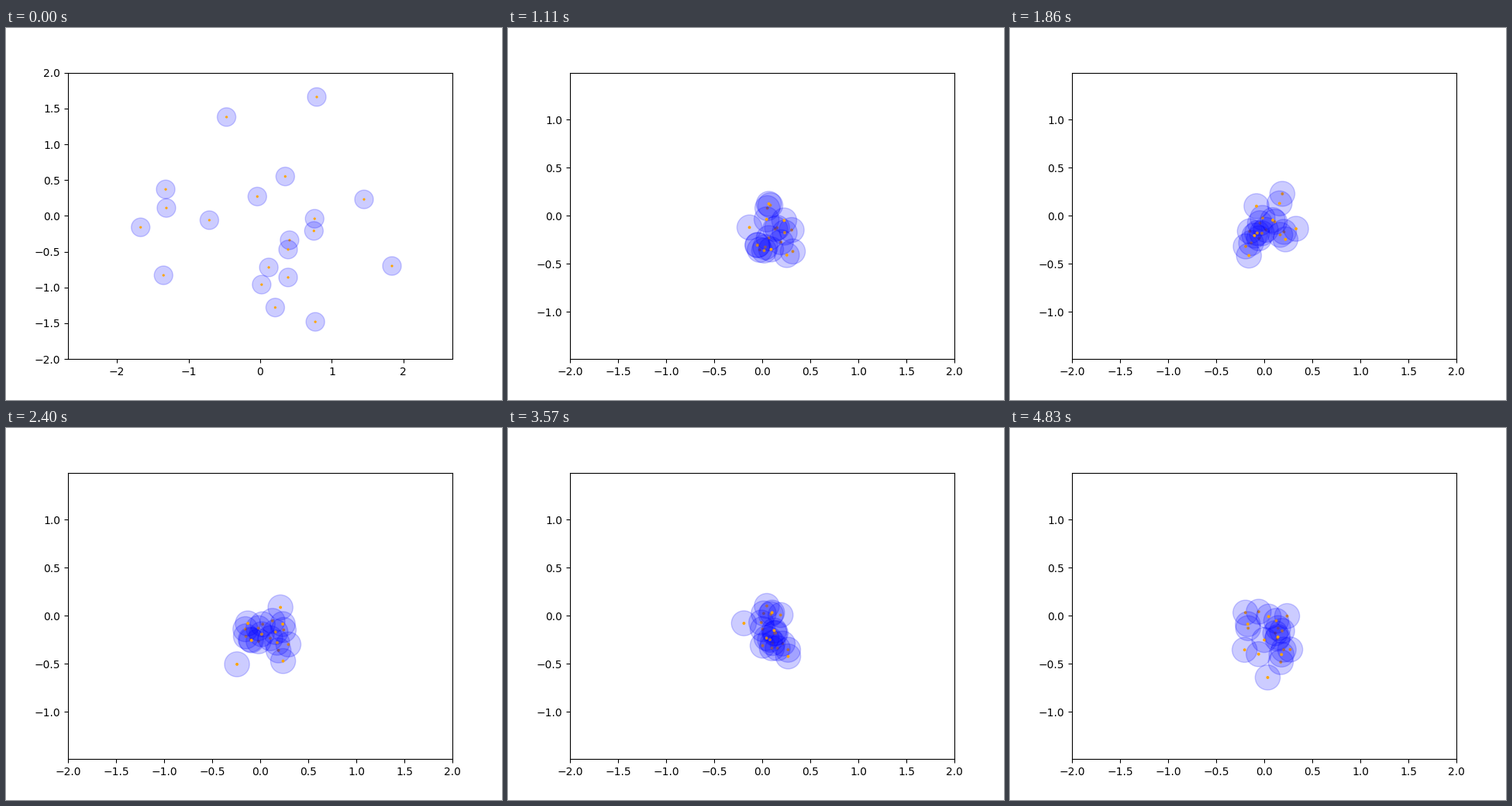
These frames come from a looping animation (640 by 480 pixels, 4.86 s). A matplotlib script:

```python
import numpy as np
import matplotlib.pyplot as plt
from matplotlib.animation import FuncAnimation
from matplotlib.patches import Circle

FRAMES, INTERVAL = 162, 30
KEEP = 0.75      # share of the distance to the centre kept per step
SPREAD = 0.155   # standard deviation of the settled swarm

START = np.array([
    (0.79, 1.66), (-0.47, 1.38), (0.35, 0.55), (-1.32, 0.37),
    (-1.31, 0.11), (-1.67, -0.16), (-0.71, -0.06), (-0.04, 0.27),
    (1.45, 0.23), (0.76, -0.04), (0.75, -0.21), (0.41, -0.34),
    (0.39, -0.47), (0.12, -0.72), (0.02, -0.96), (0.39, -0.86),
    (0.21, -1.28), (0.77, -1.48), (-1.35, -0.83), (1.84, -0.70)])


def swarm_path():
    """Pull every body towards the common centre and jostle it at random."""
    rng = np.random.default_rng(4)
    center = START.mean(axis=0)
    jostle = SPREAD * np.sqrt(1 - KEEP ** 2)
    path = [START]
    for _ in range(FRAMES - 1):
        noise = rng.normal(0, jostle, START.shape)
        path.append(center + KEEP * (path[-1] - center) + noise)
    return path


path = swarm_path()
fig, ax = plt.subplots(figsize=(6.4, 4.8), dpi=100)
box = ax.get_window_extent()
ratio = box.height / box.width

# Each dot lies on its own body but under the bodies added later.
bodies, dots = [], []
for place in START:
    bodies.append(ax.add_patch(Circle(place, 0.13, color="blue", alpha=0.2)))
    dots.append(ax.add_patch(Circle(place, 0.01, color="orange")))


def update(frame):
    # The view opens fitted to the height, then cuts to fit the width.
    half_width = 2 / ratio if frame == 0 else 2
    ax.set_xlim(-half_width, half_width)
    ax.set_ylim(-half_width * ratio, half_width * ratio)
    for body, dot, place in zip(bodies, dots, path[frame]):
        body.set_center(place)
        dot.set_center(place)
    return bodies + dots


anim = FuncAnimation(fig, update, frames=FRAMES, interval=INTERVAL,
                     init_func=lambda: update(0), repeat=True, repeat_delay=0)
plt.show()
```
